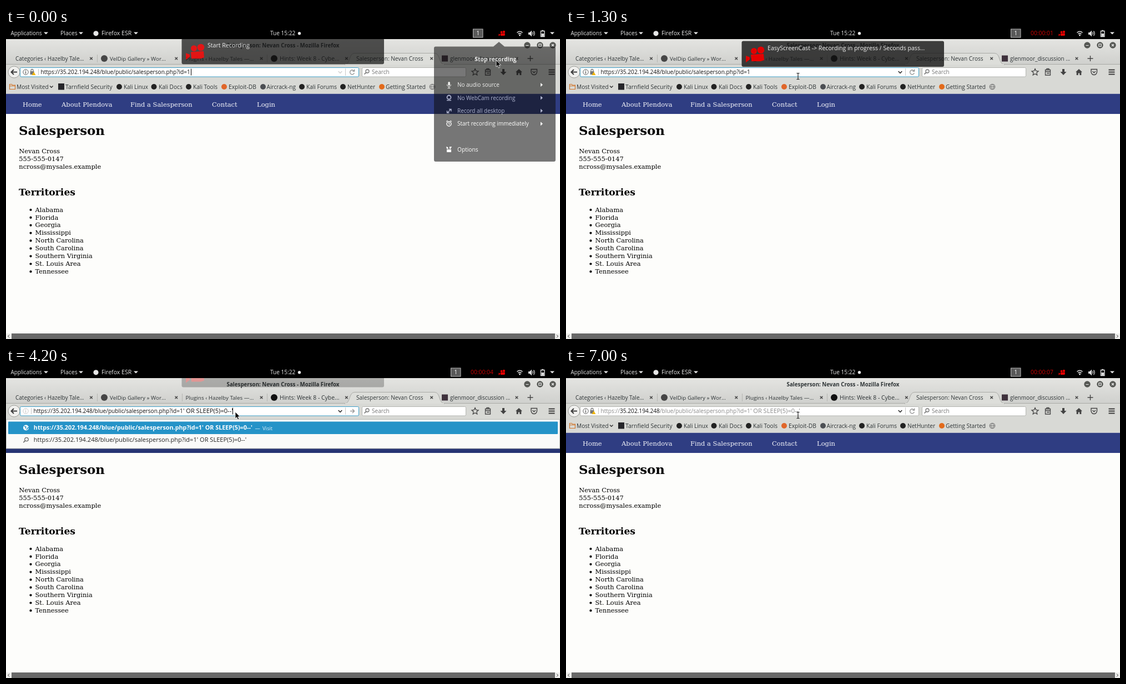
Write an HTML page that moves like this. It is 998x561 px and loops after 8000 ms.

```html
<!DOCTYPE html>
<html lang="en">
<head>
<meta charset="utf-8">
<title>Browser recording</title>
<style>
html, body { margin: 0; width: 100%; height: 100%; overflow: hidden; background: #fdfdfb; }
svg { display: block; width: 100vw; height: 100vh; }
text { font-family: "Open Sans", "Noto Sans", sans-serif; white-space: pre; }
.page text { font-family: "DejaVu Serif", serif; }
</style>
</head>
<body>
<svg id="stage" viewBox="0 0 998 561">
  <defs>
    <linearGradient id="strip" x1="0" y1="0" x2="0" y2="1">
      <stop offset="0" stop-color="#e4e4e1"/><stop offset="1" stop-color="#cfd0cd"/>
    </linearGradient>
    <clipPath id="below"><rect y="20" width="998" height="541"/></clipPath>
  </defs>
</svg>
<script>
(() => {
const NS = "http://www.w3.org/2000/svg";
const stage = document.getElementById("stage");
const INK = "#2e3436";

function el(parent, tag, attrs, content) {
  const node = document.createElementNS(NS, tag);
  for (const k in attrs) node.setAttribute(k, attrs[k]);
  if (content !== undefined) node.textContent = content;
  parent.appendChild(node);
  return node;
}
const group = (p, attrs = {}) => el(p, "g", attrs);
const rect = (p, x, y, width, height, fill, more) => el(p, "rect", { x, y, width, height, fill, ...more });
const disc = (p, cx, cy, r, fill, more) => el(p, "circle", { cx, cy, r, fill, ...more });
const shape = (p, d, fill, more) => el(p, "path", { d, fill, ...more });
const line = (p, d, stroke, width = 1) =>
  el(p, "path", { d, fill: "none", stroke, "stroke-width": width });
const text = (p, x, y, s, size = 10.15, fill = INK, more) =>
  el(p, "text", { x, y, "font-size": size, fill, ...more }, s);
const caret = (p, x, y, fill) => shape(p, `M${x - 4} ${y - 2}h8l-4 4z`, fill);
const cross = (p, x, y, r, color, w) =>
  line(p, `M${x - r} ${y - r}l${2 * r} ${2 * r}m0 ${-2 * r}l${-2 * r} ${2 * r}`, color, w);
const lens = (p, x, y, r, color) => {
  disc(p, x, y, r, "none", { stroke: color, "stroke-width": 1.3 });
  line(p, `M${x - r * .7} ${y + r * .7}l-3.4 3.4`, color, 1.6);
};
const show = (node, on) => node.setAttribute("display", on ? "inline" : "none");
const fade = (node, a) => { node.setAttribute("opacity", a); show(node, a > 0); };
const clamp = v => Math.min(1, Math.max(0, v));

// Web page
const page = group(stage, { class: "page" });
rect(page, 0, 0, 998, 561, "#fdfdfb");
rect(page, 0, 118.5, 998, 36.5, "#2f3d82");
[[30, "Home"], [100, "About Plendova"], [224, "Find a Salesperson"], [371, "Contact"], [452, "Login"]]
  .forEach(([x, s]) => text(page, x, 141.7, s, 11.5, "#f4f5fa"));
text(page, 23, 192.8, "Salesperson", 22.9, "#000", { "font-weight": 700 });
["Nevan Cross", "555-555-0147", "ncross@mysales.example"]
  .forEach((s, i) => text(page, 23.3, 225.7 + 14 * i, s, 11.44, "#000"));
text(page, 23, 301.6, "Territories", 17.2, "#000", { "font-weight": 700 });
["Alabama", "Florida", "Georgia", "Mississippi", "North Carolina", "South Carolina",
 "Southern Virginia", "St. Louis Area", "Tennessee"].forEach((s, i) => {
  const y = 331.6 + 13.93 * i;
  disc(page, 44.5, y - 3.6, 2.1, "#000");
  text(page, 52.5, y, s, 11.44, "#000");
});
rect(page, 0, 551, 998, 10, "#efefed");
rect(page, 10, 551, 979, 10, "#686868");
line(page, "M6 553.5l-2.5 2.5 2.5 2.5M992 553.5l2.5 2.5-2.5 2.5", "#333");

// Window frame and tabs
const win = group(stage);
rect(win, 0, 20, 998, 46, "url(#strip)");
rect(win, 0, 65, 998, 53.5, "#d8d9d5");
text(win, 499, 34.8, "Salesperson: Nevan Cross - Mozilla Firefox", 9.75, INK,
  { "font-weight": 700, "text-anchor": "middle" });
[939, 962, 985].forEach(x => disc(win, x, 31, 5.7, "#555753"));
line(win, "M936.5 31.5h5M959.8 28.8h4.4v4.4h-4.4z", "#eee", 1.2);
cross(win, 985, 31, 2, "#eee", 1.3);
line(win, "M0 65.5H998", "#a9aaa6");
shape(win, "M610 66C621 66 617 45.5 628 45.5H772C783 45.5 779 66 790 66z", "#dddeda", { stroke: "#a9aaa6" });
rect(win, 611, 65, 178, 2, "#dbdcd8");
[164.5, 317.5, 470.5].forEach(x => line(win, `M${x} 48v14`, "#b5b6b2"));
[[17, "Categories ‹ Hazelby Tale...", 10], [187, "VelDip Gallery » Wor...", 9.85],
 [323.5, "Plugins ‹ Hazelby Tales —...", 9.85], [493, "Hints: Week 8 - Cybe...", 10.45],
 [631, "Salesperson: Nevan Cross", 10.05], [800, "glenmoor_discussion ...", 9.95]]
  .forEach(([x, s, size], i) => {
    text(win, x, 58.6, s, size);
    cross(win, 153.5 + 153.3 * i, 55, 2.3, "#444", 1.4);
  });
disc(win, 177, 55, 6, "#464646");
disc(win, 483, 55, 6, "#111");
rect(win, 785, 49.5, 11, 11, "#3e313c");
line(win, "M944.5 50v10m-5-5h10", "#444", 1.4);

// Toolbar
const field = rect(win, 25.5, 71.5, 610, 16.5, "#fff", { rx: 2 });
rect(win, 641.5, 71.5, 187, 16.5, "#fff", { rx: 2, stroke: "#b4b5b1" });
disc(win, 14.5, 79.5, 10.5, "#f0f0ee", { stroke: "#9c9d99" });
line(win, "M20 79.5H10M14 75l-4.5 4.5 4.5 4.5", "#3c3c3c", 2);
lens(win, 651, 78, 3, "#777");
text(win, 659, 83.1, "Search", 10.1, "#777");
line(win, "M845 73.5l1.8 4 4.2.4-3.2 2.9 1 4.2-3.8-2.2-3.8 2.2 1-4.2-3.2-2.9 4.2-.4z", "#444", 1.3);
line(win, "M863.5 75.5h9v9.5h-9zM866 75v-1.5h4V75M863.5 78.5h9M866 81.5h5", "#444", 1.3);
shape(win, "M894 74h4v5h3.5l-5.5 6-5.5-6h3.5z", "#444");
shape(win, "M924 74l6 5.5h-1.7V85h-3v-3.6h-2.6V85h-3v-5.5h-1.7z", "#444");
line(win, "M946 74.5h10.5v4.5a5.2 5.5 0 0 1-10.5 0zM948.5 78l2.7 2.7 2.7-2.7", "#444", 1.4);
line(win, "M977.5 75.5h11m-11 4h11m-11 4h11", "#3c3c3c", 2);

// Bookmarks
line(win, "M6.5 101.5h4l1 1.5h5v7.5h-10zM6.5 104.5h10", "#d0762c", 1.2);
line(win, "M79 104.5l2.8 2.8 2.8-2.8", "#333", 1.4);
rect(win, 94, 100, 11, 11.5, "#26262a");
[[19, "Most Visited"], [107, "Tarnfield Security", 10.5],
 [212, "Kali Linux", 9.9, 204, "#222"], [275, "Kali Docs", 10.15, 266.5, "#222"],
 [337, "Kali Tools", 10.15, 329, "#222"], [401, "Exploit-DB", 10.3, 393, "#e0662a"],
 [469.5, "Aircrack-ng", 10.15, 463, "#4c4f54"], [541, "Kali Forums", 10.05, 533, "#222"],
 [615, "NetHunter", 10.15, 607, "#222"], [684, "Getting Started", 10.2, 677, "#e26a1b"]]
  .forEach(([x, s, size, cx, color]) => {
    if (cx) disc(win, cx, 106, 5, color);
    text(win, x, 109.6, s, size);
  });
disc(win, 768, 106, 4.7, "none", { stroke: "#777", "stroke-width": 1.2 });
line(win, "M763.5 106h9M768 101.5c-3 3-3 6 0 9c3-3 3-6 0-9", "#777");

// Address bar contents
const BASE = ["https://", "35.202.194.248", "/blue/public/salesperson.php?id=1"];
const TAIL = "' OR SLEEP(5)=0--'";
const FULL = BASE.join("") + TAIL;
function address(p, x, pale, tail) {
  const t = text(p, x, 83.1, "");
  BASE.forEach((s, i) => el(t, "tspan", { fill: pale && i !== 1 ? pale : "#111" }, s));
  if (tail) el(t, "tspan", { fill: pale || "#111", "font-size": 11.1 }, TAIL);
}
function info(p, color) {
  disc(p, 35.5, 79.5, 4.7, "none", { stroke: color });
  line(p, "M35.5 78.5v4m0-6v1.2", color, 1.3);
}
const badge = group(win);
info(badge, "#555");
shape(badge, "M43.5 78h7v6h-7z", "#777");
line(badge, "M45 78v-1.5a2 2 0 0 1 4 0v1.5", "#777", 1.3);
shape(badge, "M50 79l3.5 6h-7z", "#f0b400");
line(badge, "M58.5 74v11", "#c4c4c4");
const reload = line(win, "M627 77.6a4 4 0 1 0 .4 3.5M627.7 74.5v3.5h-3.5", "#999", 1.4);
const drop = line(win, "M598.7 78l3.3 3.3 3.3-3.3", "#333", 1.7);
line(win, "M611.5 73v13", "#c8c8c8");

const urlStart = group(win), urlEdit = group(win), urlDone = group(win);
address(urlStart, 62.5);
const cursor = line(urlStart, "M333.5 73.5v12", "#000");
info(urlEdit, "#c9c9c9");
line(urlEdit, "M45.5 74v11", "#c4c4c4");
address(urlEdit, 49.5, "", true);
line(urlEdit, "M408.5 73.5v12", "#000");
line(urlEdit, "M620 79.5h7M624 76l3.5 3.5-3.5 3.5", "#999", 1.5);
address(urlDone, 62.5, "#8a8a8a", true);

// Suggestion list
const list = group(stage);
rect(list, 0, 147, 998, 8, "#263473");
rect(list, .5, 94.5, 997, 52.5, "#fafaf9", { stroke: "#b9bab6" });
rect(list, 4, 98.5, 990, 22.5, "#2593c8", { rx: 1 });
disc(list, 36, 109.5, 5, "#fff");
line(list, "M33 107l3 1-1 3M37 113l2-3 2-1", "#2593c8", 1.5);
text(list, 49.8, 113.3, FULL, 10.8, "#fff", { "font-weight": 700 });
text(list, 448.5, 113.5, "—", 9.3, "#e4f2fa");
text(list, 462, 113.5, "Visit", 9.3, "#e4f2fa");
lens(list, 37, 130.5, 3.2, "#666");
text(list, 49.8, 135.3, FULL, 11.05, "#222");

// Notification
function camera(p, x, y, k) {
  const g = group(p, { transform: `translate(${x} ${y}) scale(${k})` });
  disc(g, 14.5, 8.5, 5.5, "#e40000");
  disc(g, 27, 6.8, 6.3, "#e40000");
  shape(g, "M9 15L32 13.5L33 25L27 27H10zM0 17L7 19.5V24L0 29z", "#e40000");
}
const note = group(group(stage, { "clip-path": "url(#below)" }));
rect(note, 316.5, 23.5, 364.5, 46.5, "#141414", { rx: 3, "fill-opacity": .8 });
camera(note, 324, 33, 1);
const noteText = text(note, 363, 40, "", 10.6, "#f0f0f0");

// Recorder menu
const menu = group(stage);
shape(menu, "M774 33.5H878L888 25L898 33.5H987a3 3 0 0 1 3 3V238a3 3 0 0 1-3 3H774a3 3 0 0 1-3-3V36.5a3 3 0 0 1 3-3z",
  "#111", { "fill-opacity": .92 });
text(menu, 882, 59.6, "Stop recording", 10.4, "#fff", { "font-weight": 700, "text-anchor": "middle" });
["No audio source", "No WebCam recording", "Record all desktop", "Start recording immediately"]
  .forEach((s, i) => {
    const y = 102.5 + 23.4 * i;
    text(menu, 813, y + 3.6, s, 9.95, "#fff");
    shape(menu, `M963 ${y - 3.5}l4 3.5-4 3.5z`, "#fff");
  });
text(menu, 813, 223, "Options", 10.2, "#fff");
line(menu, "M839 196.5h85", "#222");
rect(menu, 796.3, 97, 3.6, 7, "#fff", { rx: 1.8 });
line(menu, "M794.5 102c0 5 7 5 7 0M798 106v2.5m-2.5 0h5", "#fff");
disc(menu, 798, 125, 3.5, "none", { stroke: "#fff", "stroke-width": 1.8 });
line(menu, "M794 130.5h8M795 153l6.5-6.5m-3.5 0h4v4M798.5 153h-4v-4", "#fff", 1.4);
disc(menu, 798, 173, 4, "none", { stroke: "#fff", "stroke-width": 1.4 });
line(menu, "M798 170.5v3h2M793.5 169l2-2M802.5 169l-2-2", "#fff", 1.2);
shape(menu, "M794 219h8v5h-8zM793 214l3 1 1 3h-3zM799 214h4l-2 4h-2z", "#fff");

// Top panel
const panel = group(stage);
rect(panel, 0, 0, 998, 20, "#000");
[[8.5, "Applications", 9.9, 72], [98, "Places", 10.5, 135], [172, "Firefox ESR", 10.55, 234]]
  .forEach(([x, s, size, cx]) => {
    text(panel, x, 13.3, s, size, "#e6e6e6");
    caret(panel, cx, 9.5, "#e6e6e6");
  });
disc(panel, 162, 9.8, 4.6, "#e6e6e6");
text(panel, 476, 13.3, "Tue 15:22", 10.1, "#e6e6e6");
disc(panel, 528.5, 9.7, 2.7, "#e6e6e6");
const desk = group(panel);
rect(desk, .5, 2, 17.5, 15, "#5a5a5a", { stroke: "#bbb" });
text(desk, 9.3, 13.3, "1", 10, "#fff", { "text-anchor": "middle" });
const clock = text(panel, 837, 13.3, "", 10.3, "#d00000");
camera(panel, 887.5, 4.5, .35);
line(panel, "M920.5 8.5q5-4.5 10 0M922.5 11q3-2.7 6 0", "#ddd", 1.5);
disc(panel, 925.5, 13, 1.5, "#ddd");
shape(panel, "M941 8h2.5l3.5-3.5v11L943.5 12H941z", "#ddd");
line(panel, "M948.5 7.5q2 2.3 0 4.6M950.5 5.5q3.5 4.3 0 8.6", "#ddd", 1.2);
line(panel, "M963.5 5.5h6.5v10h-6.5zM965.5 4.5h2.5", "#ddd", 1.4);
rect(panel, 964.5, 10, 4.5, 5, "#ddd");
caret(panel, 984, 9.5, "#e6e6e6");

// Pointers, hot spot at the local origin
const outline = { stroke: "#fff", "stroke-width": .8 };
const pointers = {
  arrow: shape(stage, "M0 0V12L2.7 9.5L4.7 14L6.7 13L4.8 8.8H8.5z", "#000", outline),
  hand: shape(stage, "M-1.5 0q1.3-1.3 2 0V4L5 4.8Q6.5 5.5 6 8L5 11.5H-.5L-4 7.5Q-4 6-1.5 7z", "#000", outline),
  beam: line(stage, "M-2.5-5.5H-.8L0-5L.8-5.5H2.5M0-5V5M-2.5 5.5H-.8L0 5L.8 5.5H2.5", "#111", 1.1)
};

const PATH = [[30, 883, 58], [370, 498, 145], [570, 498, 145], [900, 418, 87]];
function pointerAt(t) {
  let i = 1;
  while (i < PATH.length - 1 && t > PATH[i][0]) i++;
  const [t0, x0, y0] = PATH[i - 1], [t1, x1, y1] = PATH[i];
  const p = clamp((t - t0) / (t1 - t0)), e = p * p * (3 - 2 * p);
  return [x0 + (x1 - x0) * e, y0 + (y1 - y0) * e];
}

const PASTE = 3030, ENTER = 4600;
function render(t) {
  const editing = t >= PASTE && t < ENTER;
  const done = t >= ENTER;
  const recording = t >= 1000;

  show(urlStart, t < PASTE);
  show(urlEdit, editing);
  show(urlDone, done);
  show(badge, !editing);
  show(reload, !editing);
  show(cursor, t < 1300);
  field.setAttribute("stroke", done ? "#b4b5b1" : "#3f9fc8");
  drop.setAttribute("opacity", .2 + .8 * clamp(t / 200));
  fade(list, editing ? clamp(.4 + (t - PASTE) / 110) : done ? .6 * clamp(1 - (t - ENTER) / 100) : 0);

  const settle = (1 - clamp(t / 64)) ** 2;
  const leave = t < 4170 ? 0 : 1 - (1 - clamp((t - 4116) / 200)) ** 2;
  note.setAttribute("transform", `translate(0 ${-5 * settle - 50 * leave})`);
  fade(note, (1 - .1 * settle) * (1 - leave));
  noteText.textContent = recording
    ? "EasyScreenCast -> Recording in progress / Seconds pass..." : "Start Recording";

  fade(menu, .62 * (1 - clamp(t / 170)));
  desk.setAttribute("transform", `translate(${recording ? 801 : 841} 0)`);
  clock.textContent = recording ? "00:00:0" + Math.floor(t / 1000) : "";

  const [x, y] = editing ? [413, 81] : pointerAt(t);
  const kind = editing ? "arrow"
    : y > 118 && y < 155 && x < 505 ? "hand"
    : y > 70 && y < 89 && x < 636 ? "beam" : "arrow";
  for (const k in pointers) show(pointers[k], k === kind);
  pointers[kind].setAttribute("transform", `translate(${x} ${y})`);
}

const begin = performance.now();
function tick() {
  render((performance.now() - begin) % 8000);
  requestAnimationFrame(tick);
}
tick();
})();
</script>
</body>
</html>
```
